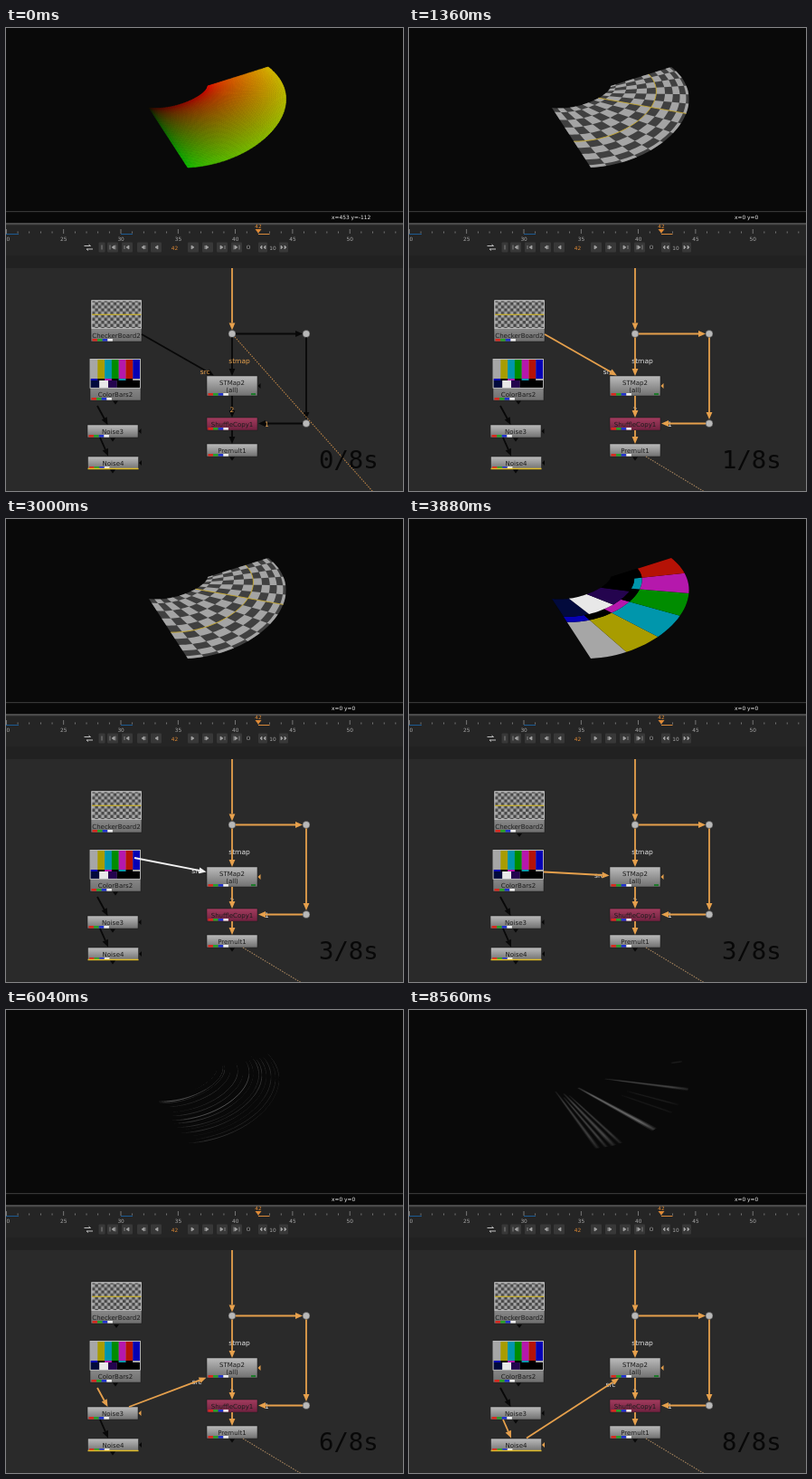
An HTML page with a canvas that plays this animation: 439 px wide and 511 px high, repeating every 8600 ms.

```html
<!DOCTYPE html>
<html lang="en">
<head>
<meta charset="utf-8">
<title>Node graph</title>
<style>
  html, body { margin: 0; width: 100%; height: 100%; overflow: hidden; background: #2a2a2a; }
  canvas, svg { position: absolute; left: 0; top: 0; display: block; }
  text { font: 7px "DejaVu Sans", sans-serif; text-anchor: middle; fill: #1c1c1c; }
  .small { font-size: 5.8px; fill: #a8a8a8; }
  .amber { fill: #e08a35; }
  .label { font-size: 7.5px; }
  #readout { font-size: 5.9px; fill: #eee; text-anchor: start; }
  #clock { font: 27.3px "DejaVu Sans Mono", monospace; text-anchor: start; fill: #080808; }
</style>
</head>
<body>
<canvas id="view" width="439" height="203"></canvas>
<svg width="439" height="511" viewBox="0 0 439 511">
  <defs>
    <linearGradient id="steel" x2="0" y2="1"><stop stop-color="#bcbcbc"/><stop offset="1" stop-color="#707070"/></linearGradient>
    <linearGradient id="wine" x2="0" y2="1"><stop stop-color="#a33c5e"/><stop offset="1" stop-color="#712140"/></linearGradient>
    <pattern id="check" width="6.8" height="6.8" patternUnits="userSpaceOnUse" x="95" y="302.7">
      <path fill="#484848" d="M0 0h6.8v6.8h-6.8z"/>
      <path fill="#a6a6a6" d="M0 0h3.4v3.4h-3.4zM3.4 3.4h3.4v3.4h-3.4z"/>
    </pattern>
  </defs>
  <g id="panel"></g>
  <g id="nodes"></g>
  <g id="wires"></g>
  <text id="readout" x="360" y="211"></text>
  <text id="clock" x="346" y="485.5"></text>
</svg>
<script>
const LOOP = 8600, ORANGE = '#e6a04c', BLACK = '#080808';
const $ = id => document.getElementById(id);
const rect = (x, y, w, h, fill, more = '') =>
  `<rect x="${x}" y="${y}" width="${w}" height="${h}" fill="${fill}" ${more}/>`;
const text = (x, y, s, more = '') => `<text x="${x}" y="${y}" ${more}>${s}</text>`;
const path = (d, fill, more = '') => `<path d="${d}" fill="${fill}" ${more}/>`;

// ---------- viewer: a bent sheet, u along the arc and v across it ----------
const UMAX = 6 / 7;
const INNER = [[158, 88], [185, 92], [222, 75], [223, 64]];
const OUTER = [[201, 154], [280, 150], [343, 85], [290, 43]];
const BARS = ['#a6a6a6', '#a89c00', '#0096ac', '#008c00', '#b518ac', '#b51206', '#0600b4'];
const STRIP = ['#0600b4', '#000', '#b518ac', '#000', '#0096ac', '#000', '#a6a6a6'];
const BASE = [['#020a3c', 0, 5], ['#e8e8e8', 5, 10], ['#24044e', 10, 15], ['#000', 15, 28]];

function bezier(p, t) {
  const r = 1 - t, c = [r * r * r, 3 * r * r * t, 3 * r * t * t, t * t * t];
  return [0, 1].map(k => p.reduce((sum, q, i) => sum + q[k] * c[i], 0));
}
function sheet(u, v) {
  const s = Math.min(1, u / UMAX), t = s + 0.35 * s * s * (1 - s);
  const k = 0.25 + 0.25 * s, f = v * (1 + k - k * v);
  const a = bezier(INNER, t), b = bezier(OUTER, t);
  return [a[0] + (b[0] - a[0]) * f, a[1] + (b[1] - a[1]) * f];
}
function trace(g, u0, v0, u1, v1, steps) {
  for (let i = 0; i <= steps; i++) {
    const q = i / steps;
    g.lineTo(...sheet(u0 + (u1 - u0) * q, v0 + (v1 - v0) * q));
  }
}
function patch(g, u0, u1, v0, v1, fill, bleed) {
  if (u0 >= UMAX) return;
  const n = Math.ceil((u1 - u0) * 40) + 1;
  g.beginPath();
  trace(g, u0, v0, u1, v0, n);
  trace(g, u1, v1, u0, v1, n);
  g.closePath();
  g.fillStyle = fill;
  g.fill();
  if (bleed) { g.strokeStyle = fill; g.lineWidth = 0.6; g.stroke(); }
}
function curve(g, u0, v0, u1, v1, color, width) {
  g.beginPath();
  trace(g, u0, v0, u1, v1, 30);
  g.strokeStyle = color;
  g.lineWidth = width;
  g.stroke();
}

const scenes = {
  map(g) {
    const nu = 60, nv = 40;
    for (let i = 0; i < nu; i++) for (let j = 0; j < nv; j++) {
      const s = (i + 0.5) / nu, v = (j + 0.5) / nv;
      const fill = `rgb(${220 * s ** 0.5 | 0},${188 * v ** 0.55 | 0},0)`;
      patch(g, i / nu * UMAX, (i + 1) / nu * UMAX, j / nv, (j + 1) / nv, fill, true);
    }
  },
  // 16 by 9 squares, centred, so the first and last rows are halved
  checker(g) {
    patch(g, 0, UMAX, 0, 1, '#404040');
    for (let i = 0; i < 14; i++) for (let j = 0; j < 10; j++)
      if ((i + j) % 2)
        patch(g, i / 16, (i + 1) / 16, Math.max(0, (j - 0.5) / 9), Math.min(1, (j + 0.5) / 9), '#a4a4a4');
    curve(g, 0, 0.5, UMAX, 0.5, '#c8aa30', 0.9);
    curve(g, 0.5, 0, 0.5, 1, '#c8aa30', 0.9);
  },
  bars(g) {
    patch(g, 0, UMAX, 0, 1, '#000');
    BARS.forEach((c, i) => patch(g, i / 7, (i + 1) / 7, 1 / 3, 1, c));
    STRIP.forEach((c, i) => patch(g, i / 7, (i + 1) / 7, 0.25, 1 / 3, c));
    BASE.forEach(([c, a, b]) => patch(g, a / 28, b / 28, 0, 0.25, c));
  },
  // fine streaks along the arc: [v, strength, phase]
  arcs(g) {
    const rows = [[0.1, 0.1, 2], [0.16, 0.36, 0], [0.18, 0.22, 1], [0.24, 0.12, 4], [0.32, 0.15, 3],
      [0.38, 0.13, 5], [0.45, 0.3, 4.4], [0.5, 0.18, 0], [0.57, 0.2, 1], [0.61, 0.16, 3],
      [0.67, 0.17, 0.5], [0.74, 0.12, 2.4], [0.81, 0.1, 4], [0.87, 0.18, 0.4]];
    for (const [v, power, phase] of rows) for (let i = 1; i < 39; i++) {
      const s = i / 40;
      const a = 1.3 * power * (0.65 + 0.35 * Math.cos(s * 5 + phase)) * Math.min(1, s * 9, (1 - s) * 6);
      curve(g, s * UMAX, v, (s + 0.025) * UMAX, v, `rgba(235,235,235,${a})`, 1);
    }
  },
  // soft streaks across the sheet: [s, half width, v start, v end, strength]
  rays(g) {
    const rays = [[0.035, 0.012, 0.02, 0.98, 0.17], [0.075, 0.01, 0.1, 0.98, 0.18],
      [0.11, 0.013, 0.05, 0.98, 0.2], [0.145, 0.01, 0.08, 0.97, 0.16], [0.315, 0.014, 0, 0.99, 0.34],
      [0.45, 0.007, 0.3, 0.95, 0.05], [0.51, 0.007, 0.3, 0.95, 0.06],
      [0.63, 0.012, 0.03, 1, 0.2], [0.86, 0.008, 0.75, 0.98, 0.07]];
    for (const [s, half, v0, v1, power] of rays) for (const w of [1, 0.6, 0.3]) {
      const u = s * UMAX, h = half * w * UMAX;
      const fade = g.createLinearGradient(...sheet(u, v0), ...sheet(u, v1));
      [0.3, 1, 1, 0.4].forEach((q, i) =>
        fade.addColorStop([0, 0.2, 0.8, 1][i], `rgba(225,225,225,${power * q * 0.5})`));
      patch(g, u - h, u + h, v0, v1, fade);
    }
  }
};
const pictures = {};
for (const name in scenes) {
  const c = document.createElement('canvas');
  c.width = 439; c.height = 203;
  const g = c.getContext('2d');
  g.fillStyle = '#090909';
  g.fillRect(0, 0, 439, 203);
  scenes[name](g);
  pictures[name] = c;
}

// ---------- timeline and transport ----------
function drawPanel() {
  let s = rect(0, 202, 439, 1.2, '#363636') + rect(0, 203.2, 439, 12, '#080808')
    + rect(0, 215, 439, 2.5, '#4a4a4a') + rect(0, 217.5, 439, 33.5, '#252525')
    + rect(0, 251, 439, 14, '#212121') + rect(0, 265, 439, 246, '#2a2a2a');
  for (let f = 20; f < 55; f++) {
    const x = (f - 20) * 12.66, major = f % 5 === 0;
    s += rect(x, major ? 222 : 224.5, 0.8, major ? 5 : 2, '#898989');
    if (major) s += text(x + 0.5, 234.5, f, 'class="small"');
  }
  s += rect(0, 227, 14, 1, '#1c5a92') + rect(127, 227, 13, 1, '#1c5a92')
    + text(279, 221, 42, 'class="small amber"')
    + path('M275.5 222h7l-3.5 4.5z', '#e08a35') + rect(279, 227, 12.5, 1, '#d8893a');

  const button = (x, icon, w = 12) => rect(x - w / 2, 236.5, w, 11, '#383838', 'rx="1"')
    + path(icon, '#a4a4a4', `transform="translate(${x} 242)" stroke="#a4a4a4" stroke-width=".7"`);
  const left = 'M2-2L-1 0L2 2z', right = 'M-2-2L1 0L-2 2z';
  s += path('M86.5 240.5h7m-2-1.5l2 1.5M96 244h-7m2 1.5l-2-1.5', 'none', 'stroke="#c0c0c0"')
    + button(106, 'M0-2.5v5', 7) + button(118, 'M-3-2.5v5' + left + 'M3-2.5v5') + button(134, left + 'M-3-2v4')
    + button(151, left + 'M3-2v4') + button(166, left) + text(186.5, 244.5, 42, 'class="small amber"')
    + button(207, right) + button(223, right + 'M-3-2v4') + button(239, right + 'M3-2v4')
    + button(255, right + 'M3-2.5v5M-3-2.5v5') + text(268, 244.3, 'O', 'class="small"')
    + button(284, 'M-1-2l-2 2l2 2zM3-2l-2 2l2 2z', 10) + text(295, 244.5, 10, 'class="small"')
    + button(307, 'M-3-2l2 2l-2 2zM1-2l2 2l-2 2z', 10);
  return s;
}

// ---------- nodes ----------
function channels(x, y) {
  return ['#d62a20', '#28a028', '#2233cc', '#eee'].map((c, i) => rect(x + i * 5.6, y, 5.6, 2.6, c)).join('');
}
function box(x, y, h, label, fill = 'url(#steel)') {
  return rect(x, y, 56, h, fill, 'stroke="#1a1a1a" stroke-width=".5"')
    + text(x + 28, h > 30 ? y + 42 : y + 9.7, label) + channels(x + 1.5, y + h - 3);
}
function drawNodes() {
  let s = box(94, 300, 46, 'CheckerBoard2')
    + rect(95, 301, 54.4, 30.6, 'url(#check)', 'stroke="#c4c4c4" stroke-width=".8"')
    + rect(95, 315.7, 54.4, 1.2, '#c8b02c')
    + box(93, 365, 46, 'ColorBars2');
  BARS.forEach((c, i) => s += rect(93.5 + i * 7.8, 366, 7.9, 21, c));
  STRIP.forEach((c, i) => s += rect(93.5 + i * 7.8, 387, 7.9, 2.3, c));
  BASE.forEach(([c, a, b]) => s += rect(93.5 + a * 1.95, 389, (b - a) * 1.95, 8, c));
  s += rect(93, 365.5, 55.4, 31.8, 'none', 'stroke="#c4c4c4" stroke-width=".8"')
    + box(90, 438, 14, 'Noise3') + box(90.5, 473, 14, 'Noise4') + rect(90.5, 485.7, 56, 1.5, '#e0bc28')
    + box(222, 384, 22, 'STMap2') + text(250, 402, '(all)') + rect(271, 403, 5, 2.2, '#1f7a2c')
    + box(222, 430, 14, 'ShuffleCopy1', 'url(#wine)') + box(222, 459, 14, 'Premult1');
  for (const [x, y] of [[250, 337.5], [332, 337.5], [332, 436.5]])
    s += `<circle cx="${x}" cy="${y}" r="4" fill="#b8b8b8" stroke="#333" stroke-width=".5"/>`;
  return s;
}

// ---------- wires ----------
function arrow(x0, y0, x1, y1, color) {
  const d = Math.hypot(x1 - x0, y1 - y0), ux = (x1 - x0) / d, uy = (y1 - y0) / d;
  const bx = x1 - ux * 8, by = y1 - uy * 8;
  return path(`M${x0} ${y0}L${bx} ${by}`, 'none', `stroke="${color}" stroke-width="1.8"`)
    + path(`M${x1} ${y1}L${bx - uy * 3.4} ${by + ux * 3.4}L${bx + uy * 3.4} ${by - ux * 3.4}z`, color);
}
const outlet = (x, y) => path(`M${x - 3} ${y}h6l-3 4z`, BLACK);
const mask = (x, y, color) => path(`M${x} ${y}l3-3v6z`, color);

const SOURCES = [
  { tail: [150, 338], out: [122, 347], scene: 'checker' },
  { tail: [149, 389.5], out: [121, 411.5], scene: 'bars' },
  { tail: [136, 438], out: [118, 452.5], scene: 'arcs' },
  { tail: [130, 472.5], out: [118, 487.5], scene: 'rays' }
];
const CONNECT = [0, 3160, 5080, 7440];
const VIEW_AT = 600;
const DRAGS = [
  [[2240, 150, 338], [2500, 164, 356], [2800, 142, 374], [3160, 142, 374]],
  [[4200, 149, 389.5], [4500, 166, 405], [4760, 158, 423], [5080, 138, 438]],
  [[6800, 136, 438], [7040, 160, 452], [7280, 146, 473], [7440, 146, 473]]
];
function dragTail(t) {
  const keys = DRAGS.find(k => t >= k[0][0] && t < k[3][0]);
  if (!keys) return null;
  const i = keys.findIndex(k => k[0] > t), [t0, x0, y0] = keys[i - 1], [t1, x1, y1] = keys[i];
  const p = (t - t0) / (t1 - t0), q = p * p * (3 - 2 * p);
  return [x0 + (x1 - x0) * q, y0 + (y1 - y0) * q];
}
function drawWires(t, src) {
  const live = t >= VIEW_AT, color = live ? ORANGE : BLACK, drag = dragTail(t);
  const [x, y] = drag || SOURCES[src].tail;
  // the wire aims at the centre of STMap2 and stops at its border
  const dx = 250 - x, dy = 395 - y, d = Math.hypot(dx, dy);
  const k = Math.min(28.5 / Math.abs(dx), 11.5 / Math.abs(dy));
  const ex = 250 - dx * k, ey = 395 - dy * k;

  let lines = arrow(250, 265, 250, 333.5, ORANGE)
    + arrow(250, 341.5, 250, 384, color) + arrow(254, 337.5, 328, 337.5, color)
    + arrow(332, 341.5, 332, 432, color) + arrow(328, 436.5, 279, 436.5, color)
    + arrow(250, 406, 250, 430, color) + arrow(250, 444, 250, 459, color)
    + arrow(x, y, ex, ey, drag ? '#f2f2f2' : color);
  lines += path(`M${live ? '262 473' : '253 341'}L498 615`, 'none',
    `stroke="${live ? '#a5835c' : '#b98245'}" stroke-width="1.1" stroke-dasharray="1.5 1.3"`);
  lines += arrow(101, 417, 112.5, 438, src === 2 ? ORANGE : BLACK)
    + arrow(104, 452, 113, 472.5, src === 3 ? ORANGE : BLACK)
    + mask(146.5, 445, src === 2 ? ORANGE : BLACK) + mask(147, 480, src === 3 ? ORANGE : BLACK)
    + mask(278.5, 395, color) + outlet(250, 473.5);
  SOURCES.forEach((s, i) => { if (i !== src) lines += outlet(...s.out); });

  const look = `class="label" style="fill:${live ? '#e2e2e2' : ORANGE}"`;
  const labels = text(258, 369.7, 'stmap', look) + text(250, 423.7, '2', look) + text(288.5, 439.7, '1', look)
    + text(ex - dx / d * 11, ey - dy / d * 11 + 3.5, 'src', look);
  return live ? labels + lines : lines + labels;
}

// ---------- playback ----------
const screen = $('view').getContext('2d');
let shown = '', wired = '';
function frame() {
  const t = Math.floor(performance.now() % LOOP / 40) * 40;
  const src = CONNECT.filter(at => t >= at).length - 1;
  const name = t < VIEW_AT ? 'map' : SOURCES[src].scene;
  if (name !== shown) screen.drawImage(pictures[shown = name], 0, 0);
  const wires = drawWires(t, src);
  if (wires !== wired) $('wires').innerHTML = wired = wires;
  $('readout').textContent = t < 1000 ? 'x=453 y=-112' : 'x=0 y=0';
  $('clock').textContent = `${Math.floor(t / 1000)}/8s`;
  requestAnimationFrame(frame);
}
$('panel').innerHTML = drawPanel();
$('nodes').innerHTML = drawNodes();
frame();
</script>
</body>
</html>
```
